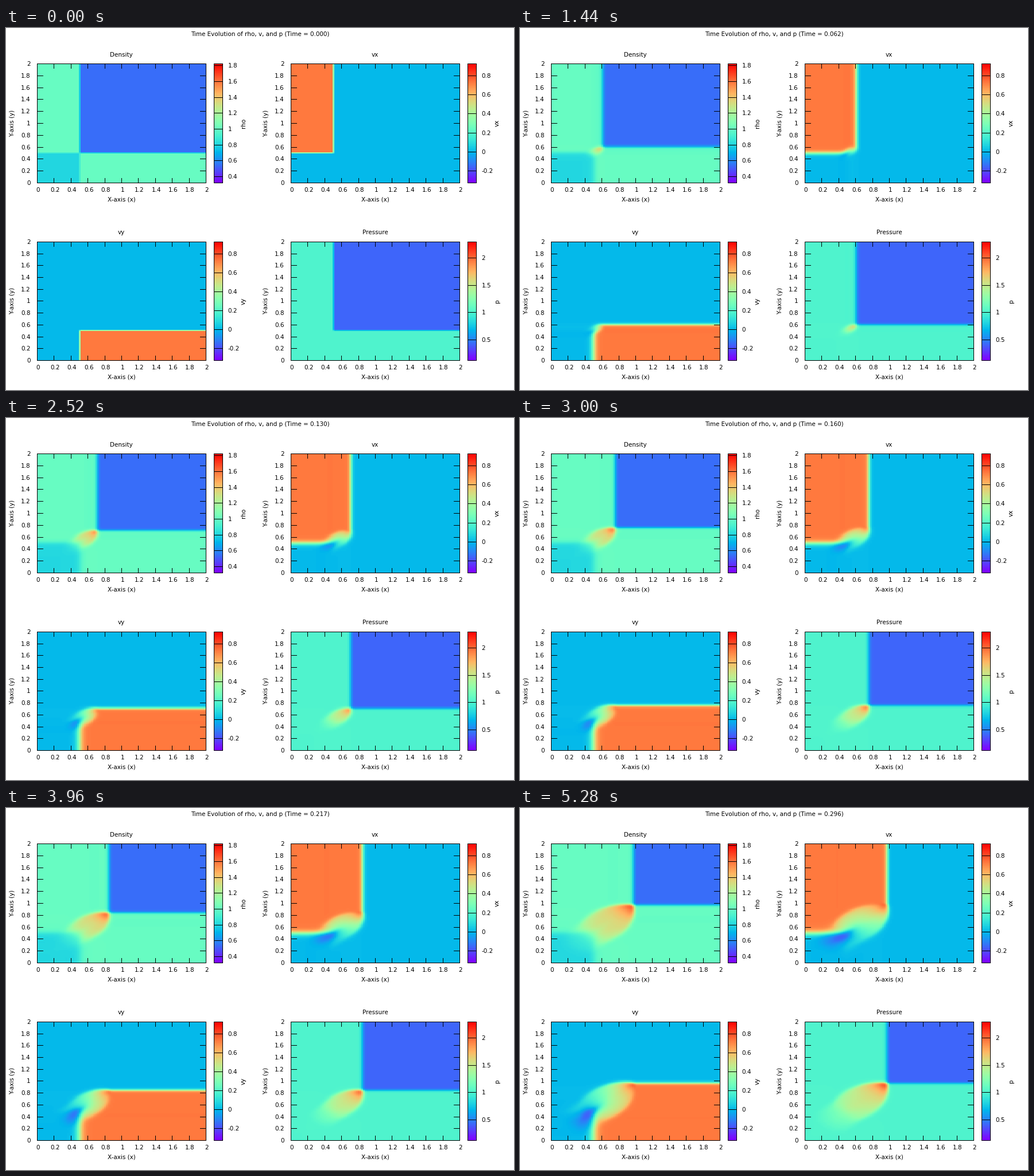
A matplotlib script that plays this animation: 885x632 px, repeating every 5.4 s.

```python
import numpy as np
import matplotlib.pyplot as plt
from matplotlib.animation import FuncAnimation
from matplotlib.collections import LineCollection

W, H, DPI = 885, 632, 100
FRAMES, INTERVAL = 45, 120
N, SIZE, GAMMA = 100, 2.0, 1.4
DX = SIZE / N
CENTRES = (np.arange(N) + 0.5) * DX
PX = 72 / DPI           # points per pixel
FONT = 10.35 * PX

# Small start-up steps, then steps limited by the wave speed.
TIMES = np.interp(np.arange(FRAMES),
                  [0, 5, 8, 16, 21, 29, 37, 44],
                  [0, 0.0084, 0.0334, 0.091, 0.130, 0.189, 0.246, 0.296])


# ---- Euler equations: limited slopes with FORCE fluxes, split by direction ----

def to_cons(w):
    rho, u, v, p = w
    energy = p / (GAMMA - 1) + 0.5 * rho * (u * u + v * v)
    return np.array([rho, rho * u, rho * v, energy])


def to_prim(q):
    rho, mu, mv, energy = q
    u, v = mu / rho, mv / rho
    p = (GAMMA - 1) * (energy - 0.5 * rho * (u * u + v * v))
    return np.array([rho, u, v, p])


def flux(q):
    rho, u, v, p = to_prim(q)
    return np.array([rho * u, rho * u * u + p, rho * u * v, u * (q[3] + p)])


def minmod(a, b):
    return np.where(a * b > 0, np.where(abs(a) < abs(b), a, b), 0)


def force(ql, qr, k):
    fl, fr = flux(ql), flux(qr)
    friedrichs = 0.5 * (fl + fr) + 0.5 * (ql - qr) / k
    richtmyer = flux(0.5 * (ql + qr) - 0.5 * k * (fr - fl))
    return 0.5 * (friedrichs + richtmyer)


def sweep_x(q, k):
    g = np.pad(q, ((0, 0), (0, 0), (2, 2)), mode="edge")
    d = np.diff(g, axis=2)
    half = 0.5 * minmod(d[..., :-1], d[..., 1:])
    lo, hi = g[..., 1:-1] - half, g[..., 1:-1] + half
    shift = 0.5 * k * (flux(lo) - flux(hi))
    f = force((hi + shift)[..., :-1], (lo + shift)[..., 1:], k)
    return q - k * np.diff(f, axis=2)


def flip(q):
    return q[[0, 2, 1, 3]].transpose(0, 2, 1)


def sweep_y(q, k):
    return flip(sweep_x(flip(q), k))


def solve():
    right, up = np.meshgrid(CENTRES > 0.5, CENTRES > 0.5)
    rho = np.where(right & up, 0.5313, np.where(right | up, 1.0, 0.8))
    u = np.where(up & ~right, 0.7276, 0.0)
    v = np.where(right & ~up, 0.7276, 0.0)
    p = np.where(right & up, 0.4, 1.0)
    q = to_cons(np.array([rho, u, v, p]))
    states = [to_prim(q)]
    for n, dt in enumerate(np.diff(TIMES)):
        order = (sweep_x, sweep_y) if n % 2 == 0 else (sweep_y, sweep_x)
        for sweep in order:
            q = sweep(q, dt / DX)
        states.append(to_prim(q))
    return states


def corner_mean(z):
    return (z[:-1, :-1] + z[1:, :-1] + z[:-1, 1:] + z[1:, 1:]) / 4


states = solve()

# ---- Drawing, in pixel coordinates with y downwards ----

fig = plt.figure(figsize=(W / 100, H / 100), dpi=DPI, facecolor="white")
ax = fig.add_axes([0, 0, 1, 1])
ax.set_xlim(0, W)
ax.set_ylim(H, 0)
ax.axis("off")
ax.set_autoscale_on(False)


def label(x, y, s, ha="center", **kw):
    kw.setdefault("va", "baseline")
    return ax.text(x, y, s, ha=ha, fontsize=FONT, family="DejaVu Sans",
                   color="black", **kw)


def lines(segments):
    # Half-pixel centres give crisp one-pixel lines without snapping.
    art = LineCollection(np.array(segments) + 0.5, colors="black",
                         linewidths=PX, capstyle="projecting", zorder=3)
    art.set_snap(False)
    ax.add_collection(art, autolim=False)


def box(l, t, r, b):
    return [[(l, t), (r, t)], [(r, t), (r, b)],
            [(r, b), (l, b)], [(l, b), (l, t)]]


def mesh(x, y, z, lim):
    return ax.pcolormesh(x, y, z, cmap="rainbow", vmin=lim[0], vmax=lim[1],
                         antialiased=False, zorder=1)


def panel(l, t, b, title, name, lim, ticks):
    r = l + 294
    sx, sy = (r - l) / SIZE, (b - t) / SIZE

    # Cells meet on whole pixels; the outermost ones include their border.
    x_edges = np.round(l + CENTRES * sx) + 1
    y_edges = np.round(b - CENTRES * sy)
    x_edges[0] -= 1
    y_edges[0] += 1
    field = mesh(x_edges, y_edges, corner_mean(states[0][0]), lim)

    segs = box(l, t, r, b)
    for i in range(11):
        val = i / 5
        x, y = round(l + val * sx), round(b - val * sy)
        segs += [[(x, b), (x, b - 8)], [(x, t), (x, t + 8)],
                 [(l, y), (l + 10, y)], [(r, y), (r - 10, y)]]
        label(l + 2 + val * sx, b + 16.5, f"{val:g}")
        label(l - 11.5, b - val * sy + 4, f"{val:g}", ha="right")

    cl, cr = l + 308, l + 323
    rows = np.linspace(*lim, b - t)[:, None]
    mesh([cl, cr], np.arange(b, t - 1, -1), rows, lim)
    segs += box(cl, t, cr, b)
    for val in ticks:
        y = b - (val - lim[0]) / (lim[1] - lim[0]) * (b - t)
        segs.append([(cl, round(y)), (cr, round(y))])
        label(cr + 9.5, y + 4, f"{val:g}", ha="left")
    lines(segs)

    mid = (t + b) / 2
    label(l + 147, t - 12.5, title)
    label(l + 147, b + 32, "X-axis (x)")
    label(l - 43, mid, "Y-axis (y)", rotation=90, va="center")
    label(l + 360, mid, name, rotation=90, va="center")
    return field


UPPER, LOWER = (62, 270), (373, 580)
V_LIM, V_TICKS = (-0.327, 0.9276), (-0.2, 0, 0.2, 0.4, 0.6, 0.8)
fields = [
    panel(54, *UPPER, "Density", "rho", (0.3188, 1.825),
          (0.4, 0.6, 0.8, 1, 1.2, 1.4, 1.6, 1.8)),
    panel(496, *UPPER, "vx", "vx", V_LIM, V_TICKS),
    panel(54, *LOWER, "vy", "vy", V_LIM, V_TICKS),
    panel(496, *LOWER, "Pressure", "p", (0.116, 2.295), (0.5, 1, 1.5, 2)),
]
heading = label(442.5, 13.5, "")


def draw(n):
    for field, values in zip(fields, states[n]):
        field.set_array(corner_mean(values))
    heading.set_text(
        f"Time Evolution of rho, v, and p (Time = {TIMES[n]:.3f})")
    return fields + [heading]


anim = FuncAnimation(fig, draw, frames=FRAMES, interval=INTERVAL,
                     repeat=True, repeat_delay=0, blit=False)
plt.show()
```
